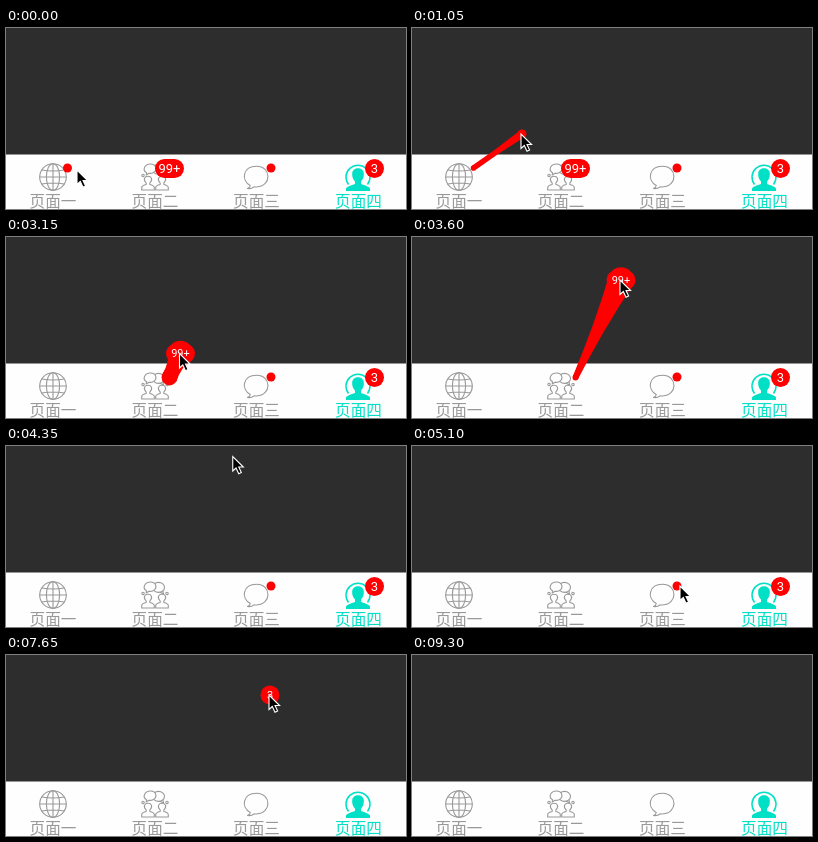
These frames come from a looping animation (400x181 px, 9600 ms). An HTML page:

```html
<!DOCTYPE html>
<html lang="zh-CN">
<head>
<meta charset="utf-8">
<title>Draggable tab badges</title>
<style>
  html, body { margin: 0; height: 100%; overflow: hidden; background: #2d2d2d; }
  svg { display: block; width: 400px; height: 181px; }
  .icon { fill: none; stroke: #999; stroke-width: 1.1; stroke-linejoin: round; stroke-linecap: round; }
  .solid { fill: #fefefe; }
  .label { font: 15.6px "Noto Sans CJK SC", "Noto Sans CJK", sans-serif; fill: #999; text-anchor: middle; }
  .active { fill: #00e0c6; }
  #badges { fill: #f00; }
  #badges text { fill: #fff; font-family: Roboto, sans-serif; text-anchor: middle; }
</style>
</head>
<body>
<svg viewBox="0 0 400 181">
  <rect width="400" height="181" fill="#2d2d2d"/>
  <rect y="126.5" width="400" height="55" fill="#fefefe"/>

  <g class="icon" transform="translate(47 149)">
    <circle r="13.3"/>
    <ellipse rx="6.6" ry="13.3"/>
    <path d="M0-13.3V13.3M-13.3 0H13.3M-11.3-7Q0-5 11.3-7M-11.3 7Q0 5 11.3 7"/>
  </g>

  <g class="icon" transform="translate(149 149)">
    <ellipse cx="3.5" cy="-7.6" rx="6" ry="5"/>
    <path class="solid" d="M-8.5-4.2C-13-7-10.5-13-4.5-13S2.5-7 -1.5-4.5Q-4-3.3-6-3.7L-8.8-2Z"/>
    <path d="M5-2.8L8.5-1L8-4"/>
    <path class="solid" d="M-13.3 13V10.5Q-13 8.5-8.8 7.5V6C-12.5 2-10-.8-7-.8S-1.5 2-5.2 6V7.5Q-1 8.5-.7 10.5V13Z"/>
    <path class="solid" d="M.7 13V10.5Q1 8.5 5.2 7.5V6C1.5 2 4-.8 7-.8S12.5 2 8.8 6V7.5Q13 8.5 13.3 10.5V13Z"/>
    <circle cx="-12" cy="-1.5" r="1.2"/><circle cx="12" cy="-1.5" r="1.2"/>
  </g>

  <path class="icon" d="M241.5 160.5Q244 159.5 244.3 157.5C234.5 152 237 138.3 250.5 138.3C265.5 138.3 266 158.3 250.5 159Q249 159 248 158.8Q245.5 161 241.5 160.5Z"/>

  <g transform="translate(352 149)">
    <path d="M-9.5 7.5A12 12 0 1 1 9.5 7.5" fill="none" stroke="#00e0c6" stroke-width="1.5"/>
    <path class="active" d="M-12 14V11.5Q-11.5 9.5-3 7V4.5C-5.5 2-6-1-5.8-4C-5.3-10.5 5.3-10.5 5.8-4C6-1 5.5 2 3 4.5V7Q11.5 9.5 12 11.5V14Z"/>
  </g>

  <text class="label" x="47" y="179">页面一</text>
  <text class="label" x="149" y="179">页面二</text>
  <text class="label" x="250.5" y="179">页面三</text>
  <text class="label active" x="352.5" y="179">页面四</text>

  <g id="badges"></g>
  <path id="cursor" d="M0 0V14.5L3.3 11.5L6 17.3L8.6 16.1L6 10.5H10.6Z" fill="#000" stroke="#fff" stroke-width="1.1"/>
</svg>
<script>
const STEP = 150, STEPS = 64, REACH = 110;

// Pointer path: [step, x, y], linear between entries
const path = [
  [0, 71, 142], [2, 62, 142], [3, 62, 142], [7, 109, 106], [10, 92, 139],
  [14, 114, 43], [15, 116, 38], [17, 152, 106], [19, 162, 141], [20, 162, 141],
  [24, 208, 43], [27, 218.5, 20], [28, 218.5, 20], [30, 235, 1], [34, 268, 140],
  [35, 235, 105], [36, 208, 68], [38, 187, 40], [39, 187, 40], [40, 202, 26],
  [42, 278, 94], [44, 386, 138], [45, 374, 142], [46, 366, 138], [51, 263, 40],
  [52, 263, 40], [56, 300, 94], [60, 300, 94], [61, 313, 164], [62, 313, 190]
];

// Each badge is held from step "grab" and disappears at step "drop"
const badges = [
  { x: 61.5, y: 140, w: 9, h: 9, text: '', grab: 4, drop: 16 },
  { x: 163.5, y: 140.5, w: 29, h: 19, text: '99+', grab: 21, drop: 29 },
  { x: 265, y: 140, w: 9, h: 9, text: '', grab: 35, drop: 40 },
  { x: 368.5, y: 140.5, w: 19, h: 19, text: '3', grab: 46, drop: 53 }
];

const layer = document.getElementById('badges');
const cursor = document.getElementById('cursor');

function pointerAt(step) {
  const i = path.findIndex(p => p[0] > step);
  if (i < 0) return path[path.length - 1].slice(1);
  const [s0, x0, y0] = path[i - 1], [s1, x1, y1] = path[i];
  const k = (step - s0) / (s1 - s0);
  return [x0 + (x1 - x0) * k, y0 + (y1 - y0) * k];
}

const circle = (x, y, r) => `<circle cx="${x}" cy="${y}" r="${r}"/>`;

function pill({ w, h, text }, x, y, size) {
  return `<rect x="${x - w / 2}" y="${y - h / 2}" width="${w}" height="${h}" rx="${h / 2}"/>` +
    `<text x="${x}" y="${y + size * .36}" font-size="${size}">${text}</text>`;
}

// Elastic band between the resting place and the held badge
function band(b, x, y) {
  const dx = x - b.x, dy = y - b.y, d = Math.hypot(dx, dy);
  if (d > REACH || d < 1) return '';
  const r0 = b.h / 2 * (1 - .7 * d / REACH), r1 = b.w * .44;
  const mid = (r0 + r1) * .3;
  const at = (k, r) => `${b.x + dx * k - dy / d * r} ${b.y + dy * k + dx / d * r}`;
  return circle(b.x, b.y, r0) + circle(x, y, r1) +
    `<path d="M${at(0, r0)}Q${at(.5, mid)} ${at(1, r1)}L${at(1, -r1)}Q${at(.5, -mid)} ${at(0, -r0)}Z"/>`;
}

function draw(step) {
  const [px, py] = pointerAt(step);
  layer.innerHTML = badges.map(b => {
    if (step >= b.drop) return '';
    if (step < b.grab) return pill(b, b.x, b.y, 13);
    return band(b, px + 1, py) + pill(b, px + 1, py, 11);
  }).join('');
  cursor.setAttribute('transform', `translate(${px} ${py})`);
}

let shown = -1;
const start = performance.now();
function tick() {
  const step = Math.floor((performance.now() - start) / STEP) % STEPS;
  if (step !== shown) draw(shown = step);
  requestAnimationFrame(tick);
}
tick();
</script>
</body>
</html>
```
